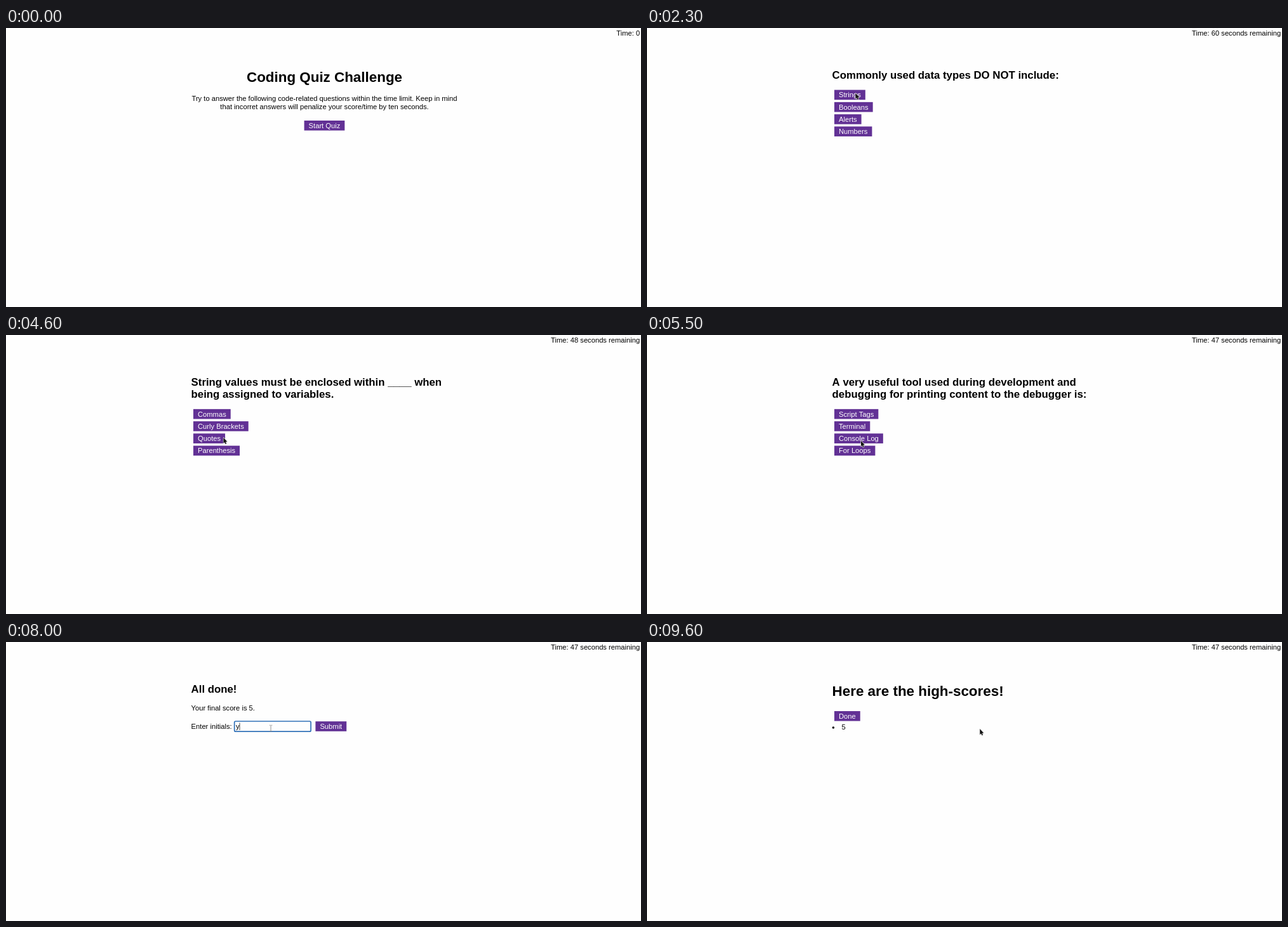
Write an HTML page with a canvas that moves like this. It is 1000 px wide and 440 px high and loops after 9800 ms.

```html
<!DOCTYPE html>
<html lang="en">
<head>
<meta charset="utf-8">
<title>Coding quiz</title>
<style>
  html, body { margin: 0; width: 100%; height: 100%; overflow: hidden; background: #fefefe; }
  canvas { display: block; }
</style>
</head>
<body>
<canvas id="stage" width="1000" height="440"></canvas>
<script>
const ctx = document.getElementById('stage').getContext('2d');
const LOOP = 9800, STEP = 100;
const LEFT = 291.6, MID = 501.5, LINE = 19.25;
const PURPLE = '#623195';
const FAMILY = '"Liberation Sans", Arial, sans-serif';
const BODY = `11.2px ${FAMILY}`, H2 = `bold 16.8px ${FAMILY}`, H1 = `bold 22.4px ${FAMILY}`;

const questions = [
  { at: 1200, title: ['Commonly used data types DO NOT include:'],
    options: ['Strings', 'Booleans', 'Alerts', 'Numbers'] },
  { at: 2600, title: ['The condition in an if / else statement is enclosed', 'within ____.'],
    options: ['Quotes', 'Curly Brackets', 'Parenthesis', 'Square Brackets'] },
  { at: 3700, title: ['Arrays in a program can be used to store ____.'],
    options: ['Numbers and Strings', 'Other Arrays', 'Booleans', 'All of the Above'] },
  { at: 4600, title: ['String values must be enclosed within ____ when', 'being assigned to variables.'],
    options: ['Commas', 'Curly Brackets', 'Quotes', 'Parenthesis'] },
  { at: 5500, title: ['A very useful tool used during development and', 'debugging for printing content to the debugger is:'],
    options: ['Script Tags', 'Terminal', 'Console Log', 'For Loops'] }
];

const clock = [[0, '0'], [2200, '60'], [3200, '54'], [4200, '48'], [5200, '47']];
const typed = [[0, ''], [8000, 'y'], [8200, 'yb']];

// Pointer moves: first step, last step, end x, end y
const moves = [
  [200, 300, 556, 199],
  [500, 800, 502, 153],
  [1600, 1900, 342, 116],
  [2100, 2300, 328.5, 103],
  [2800, 3500, 342.5, 145.5],
  [3900, 4000, 342.5, 162],
  [5000, 5300, 337, 167],
  [6600, 6900, 417, 136],
  [8700, 9400, 524.3, 137.3]
];

const latest = (list, t) => list.filter(e => e[0] <= t).pop()[1];

function text(str, x, y, font = BODY, align = 'left', color = '#000') {
  ctx.font = font;
  ctx.textAlign = align;
  ctx.fillStyle = color;
  ctx.fillText(str, x, y);
}

function button(label, x, y) {
  ctx.font = BODY;
  const w = ctx.measureText(label).width + 14;
  ctx.fillStyle = PURPLE;
  ctx.fillRect(x, y, w, 15.6);
  text(label, x + 7, y + 11.7, BODY, 'left', '#fff');
}

function box(x, y, w, h, width, color) {
  ctx.lineWidth = width;
  ctx.strokeStyle = color;
  ctx.beginPath();
  ctx.roundRect(x, y, w, h, 2);
  ctx.stroke();
}

function intro() {
  text('Coding Quiz Challenge', MID, 85, H1, 'center');
  text('Try to answer the following code-related questions within the time limit. Keep in mind', MID, 115.4, BODY, 'center');
  text('that incorret answers will penalize your score/time by ten seconds.', MID, 128.4, BODY, 'center');
  button('Start Quiz', 469.6, 146);
}

function question(q) {
  q.title.forEach((line, i) => text(line, LEFT, 80 + i * LINE, H2));
  const top = 97.6 + (q.title.length - 1) * LINE;
  q.options.forEach((label, i) => button(label, 295, top + i * LINE));
}

function form(t) {
  text('All done!', LEFT, 80, H2);
  text('Your final score is 5.', LEFT, 108);
  text('Enter initials:', LEFT, 137);
  button('Submit', 487.4, 125.2);
  if (t < 7500) {
    box(359.5, 124.5, 121, 17, 1, '#777');
    return;
  }
  box(359.7, 125, 120.4, 16.2, 1.7, '#3272b8');
  const value = latest(typed, t);
  text(value, 362, 137);
  const since = t - (t >= 8200 ? 8200 : t >= 8000 ? 8000 : 7500);
  if (since % 1000 < 500) {
    ctx.fillStyle = '#222';
    ctx.fillRect(362 + ctx.measureText(value).width, 127.5, 0.8, 11.5);
  }
}

function scores() {
  text('Here are the high-scores!', LEFT, 85, H1);
  button('Done', 295, 109);
  ctx.beginPath();
  ctx.arc(293.4, 135, 1.8, 0, Math.PI * 2);
  ctx.fillStyle = '#000';
  ctx.fill();
  text('5', 306.6, 138.4);
}

function pointerAt(t) {
  let x = 562, y = 203;
  for (const [from, to, ex, ey] of moves) {
    if (t < from) break;
    const p = Math.min(1, (t - from + STEP) / (to - from + STEP));
    const k = p * p * (3 - 2 * p);
    x += (ex - x) * k;
    y += (ey - y) * k;
  }
  return [x, y];
}

function arrow(x, y) {
  const shape = [[0, 0], [0, 8.6], [1.9, 6.9], [3.2, 9.9], [4.6, 9.3], [3.3, 6.4], [5.8, 6.2]];
  ctx.beginPath();
  shape.forEach(([dx, dy]) => ctx.lineTo(x + dx, y + dy));
  ctx.closePath();
  ctx.lineJoin = 'round';
  ctx.lineWidth = 1.3;
  ctx.strokeStyle = '#ddd';
  ctx.stroke();
  ctx.fillStyle = '#111';
  ctx.fill();
}

function beam(x, y) {
  ctx.fillStyle = '#888';
  ctx.fillRect(x - 0.4, y - 4.5, 0.9, 9);
  for (const dy of [-5.2, 4.4]) {
    ctx.fillRect(x - 2.2, y + dy, 1.8, 0.8);
    ctx.fillRect(x + 0.5, y + dy, 1.8, 0.8);
  }
}

function draw(t) {
  ctx.fillStyle = '#fefefe';
  ctx.fillRect(0, 0, 1000, 440);

  const time = latest(clock, t);
  text(`Time: ${time}${time === '0' ? '' : ' seconds remaining'}`, 998.2, 11.5, BODY, 'right');

  if (t < 1200) intro();
  else if (t < 6200) question(questions.filter(q => q.at <= t).pop());
  else if (t < 9600) form(t);
  else scores();

  if (t < 200) return;
  const [x, y] = pointerAt(t);
  const overInput = t >= 6200 && t < 9600 && x > 359 && x < 481 && y > 124 && y < 142;
  (overInput ? beam : arrow)(x, y);
}

const start = performance.now();
function tick() {
  const t = (performance.now() - start) % LOOP;
  draw(Math.floor(t / STEP) * STEP);
  requestAnimationFrame(tick);
}
tick();
</script>
</body>
</html>
```
